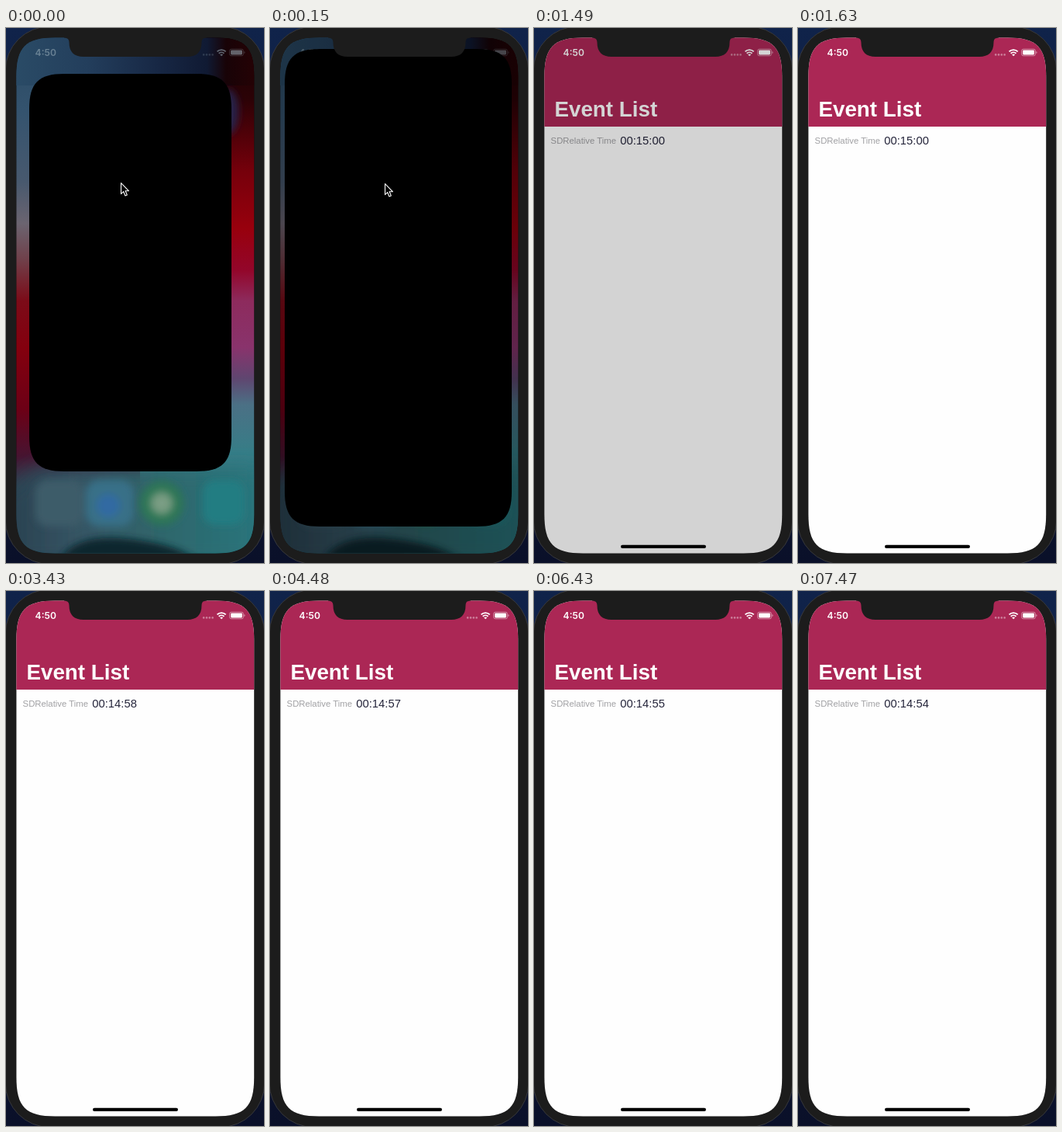
Recreate the animation shown at these times as an HTML page. Size 333x689 px, loop 8 s.

```html
<!DOCTYPE html>
<html lang="en">
<head>
<meta charset="utf-8">
<title>Event countdown</title>
<style>
  html, body { margin: 0; width: 100%; height: 100%; overflow: hidden; background: #0b1733; }
  svg { display: block; width: 333px; height: 689px; }
  text { font-family: "Liberation Sans", Arial, sans-serif; }
  .clock { font: 600 12.1px Inter, sans-serif; }
</style>
</head>
<body>
<svg viewBox="0 0 333 689">
  <defs>
    <clipPath id="screen"><path id="screenShape"/></clipPath>
    <linearGradient id="desk" x2="0" y2="1">
      <stop stop-color="#10234a"/><stop offset="1" stop-color="#0a1029"/>
    </linearGradient>
    <linearGradient id="leftSide" x2="0" y2="1">
      <stop stop-color="#284862"/><stop offset=".14" stop-color="#34536e"/>
      <stop offset=".28" stop-color="#48596e"/><stop offset=".36" stop-color="#6b6470"/>
      <stop offset=".43" stop-color="#70404a"/><stop offset=".51" stop-color="#7c0b18"/>
      <stop offset=".6" stop-color="#84000e"/><stop offset=".72" stop-color="#6c0016"/>
      <stop offset=".81" stop-color="#471431"/><stop offset=".87" stop-color="#2d4353"/>
      <stop offset="1" stop-color="#1c4a57"/>
    </linearGradient>
    <linearGradient id="rightSide" x2="0" y2="1">
      <stop stop-color="#160204"/><stop offset=".12" stop-color="#2c0206"/>
      <stop offset=".26" stop-color="#76000b"/><stop offset=".37" stop-color="#98000d"/>
      <stop offset=".45" stop-color="#93062a"/><stop offset=".51" stop-color="#8d2b5d"/>
      <stop offset=".6" stop-color="#89336c"/><stop offset=".66" stop-color="#5f4670"/>
      <stop offset=".71" stop-color="#4b7085"/><stop offset=".8" stop-color="#377d87"/>
      <stop offset="1" stop-color="#216c74"/>
    </linearGradient>
    <linearGradient id="sky">
      <stop stop-color="#2a4b66"/><stop offset=".3" stop-color="#233e5c"/>
      <stop offset=".6" stop-color="#172744"/><stop offset=".8" stop-color="#101a33"/>
      <stop offset=".88" stop-color="#180307"/><stop offset="1" stop-color="#250205"/>
    </linearGradient>
    <linearGradient id="dock">
      <stop stop-color="#29404f"/><stop offset=".3" stop-color="#365665"/>
      <stop offset=".6" stop-color="#2f666b"/><stop offset="1" stop-color="#28757c"/>
    </linearGradient>
    <radialGradient id="green">
      <stop stop-color="#83a58c"/><stop offset=".35" stop-color="#649074"/>
      <stop offset=".65" stop-color="#2f7757"/><stop offset="1" stop-color="#2b7358"/>
    </radialGradient>
    <filter id="soft" x="-50%" y="-50%" width="200%" height="200%"><feGaussianBlur stdDeviation="5"/></filter>
    <filter id="softer" x="-50%" y="-50%" width="200%" height="200%"><feGaussianBlur stdDeviation="12"/></filter>
    <g id="status">
      <text class="clock" x="37.6" y="35.6">4:50</text>
      <g opacity=".4">
        <circle cx="255.2" cy="34.4" r="1.3"/><circle cx="259" cy="34.4" r="1.3"/>
        <circle cx="262.8" cy="34.4" r="1.3"/><circle cx="266.6" cy="34.4" r="1.3"/>
      </g>
      <g fill="none" stroke="currentColor" stroke-width="1.9">
        <path d="M272.5 30.4a8 8 0 0 1 11.2 0M274.7 32.7a5 5 0 0 1 6.8 0"/>
      </g>
      <path d="M276.1 34.3a3 3 0 0 1 4 0l-2 2z"/>
      <rect x="288.5" y="27.2" width="18" height="8.6" rx="2.5" fill="none" stroke="currentColor" stroke-width=".9" opacity=".5"/>
      <rect x="290" y="28.6" width="15" height="5.8" rx="1.3"/>
      <path d="M307.4 30v3q1.1-.4 1.1-1.5t-1.1-1.5" opacity=".5"/>
    </g>
  </defs>

  <rect width="333" height="689" fill="url(#desk)"/>
  <rect x="-.8" y="-2" width="334.6" height="692.5" rx="57" fill="#1c1c1c" stroke="#3a3b40" stroke-width=".9"/>

  <g clip-path="url(#screen)">
    <rect x="13" y="12" width="308" height="666"/>

    <g id="home">
      <rect x="13" y="12" width="160" height="666" fill="url(#leftSide)"/>
      <rect x="173" y="12" width="148" height="666" fill="url(#rightSide)"/>
      <rect x="13" y="12" width="308" height="62" fill="url(#sky)"/>
      <ellipse cx="287" cy="108" rx="13" ry="29" fill="#25234a" filter="url(#soft)"/>
      <path d="M40 566H330V690H0V600Z" fill="url(#dock)" filter="url(#softer)"/>
      <path d="M70 684Q90 650 160 658T250 690Z" fill="#08252d" filter="url(#soft)"/>
      <g filter="url(#soft)">
        <rect x="38" y="582" width="62" height="60" rx="16" fill="#3d5b69"/>
        <rect x="103" y="582" width="62" height="60" rx="18" fill="#387087"/>
        <circle cx="132" cy="615" r="15" fill="#316aa2"/>
        <rect x="254" y="582" width="54" height="58" rx="16" fill="#227d82"/>
      </g>
      <circle cx="201" cy="612" r="29" fill="url(#green)" filter="url(#soft)"/>
      <circle cx="201" cy="612" r="12" fill="#80a087" opacity=".6" filter="url(#soft)"/>
      <use href="#status" fill="#9fb3bd" color="#9fb3bd" opacity=".55"/>
      <rect id="dim" x="13" y="12" width="308" height="666"/>
      <path id="card"/>
    </g>

    <g id="app">
      <rect x="13" y="12" width="308" height="666" fill="#fefefe"/>
      <rect x="13" y="12" width="308" height="115" fill="#ab2755"/>
      <use href="#status" fill="#fff" color="#fff"/>
      <text x="26.4" y="113.7" font-size="27.8" font-weight="700" fill="#fff">Event List</text>
      <text x="21.6" y="149" font-size="11.35" fill="#a1a1a4">SDRelative Time</text>
      <text id="count" x="111.3" y="150.4" font-size="14.8" fill="#25253b"></text>
      <rect id="fade" x="13" y="12" width="308" height="666"/>
    </g>

    <rect id="bar" x="112" y="665.8" width="110" height="4.2" rx="2.1"/>
  </g>

  <path fill="#1c1c1c" d="M75 10V12.4Q81.5 12.4 81.5 18.5C81.5 31 88 37 100 37H234C246 37 252.500 31 252.500 18.500Q252.500 12.400 259 12.400V10Z"/>

  <path id="cursor" d="M.5 .7V14.700L3.700 11.700L5.900 17L8.300 16L6.100 10.800H10.500Z" stroke="#fff" stroke-width="1.1" stroke-linejoin="round"/>
</svg>
<script>
  const LOOP = 8000;
  const $ = id => document.getElementById(id);

  // Card edges and the darkness of the home screen behind it
  const launch = [
    { at: 0, box: [30, 59, 291, 571], dim: 0 },
    { at: 150, box: [19, 27, 312, 642], dim: .3 },
    { at: 290, box: [14, 14, 319, 673], dim: .7 },
    { at: 440, box: [13, 12, 321, 678], dim: 1 }
  ];
  const pointer = [
    { at: 0, x: 148, y: 199 },
    { at: 150, x: 148, y: 200 },
    { at: 290, x: 148, y: 203 },
    { at: 440, x: 148, y: 209 },
    { at: 590, x: 247, y: 440 },
    { at: 740, x: 265, y: 465 },
    { at: 1190, hidden: true }
  ];
  const ticks = [2380, 3430, 4480, 5530, 6430, 7470];
  const APP_START = 1490, APP_LIT = 1630;

  const stepAt = (steps, t) => steps.filter(s => s.at <= t).pop();
  const show = (id, on) => $(id).setAttribute('display', on ? 'inline' : 'none');
  const pad = n => String(n).padStart(2, '0');

  // Rounded box with continuous corners: e is their reach, c the pull
  function squircle([l, t, r, b], e, c) {
    return `M${l} ${t + e}C${l} ${t + c} ${l + c} ${t} ${l + e} ${t}` +
      `H${r - e}C${r - c} ${t} ${r} ${t + c} ${r} ${t + e}` +
      `V${b - e}C${r} ${b - c} ${r - c} ${b} ${r - e} ${b}` +
      `H${l + e}C${l + c} ${b} ${l} ${b - c} ${l} ${b - e}Z`;
  }

  function draw(t) {
    const { box, dim } = stepAt(launch, t);
    show('home', t < 440);
    $('card').setAttribute('d', squircle(box, 45, 12));
    $('dim').setAttribute('opacity', dim);

    const p = stepAt(pointer, t);
    show('cursor', !p.hidden);
    if (!p.hidden) $('cursor').setAttribute('transform', `translate(${p.x} ${p.y})`);

    show('app', t >= APP_START);
    $('fade').setAttribute('opacity', t < APP_LIT ? .17 : 0);
    const left = 15 * 60 - ticks.filter(at => at <= t).length;
    $('count').textContent = `00:${pad(Math.floor(left / 60))}:${pad(left % 60)}`;

    show('bar', t >= 440);
    $('bar').setAttribute('fill', t < APP_START ? '#4b4b4b' : '#000');
  }

  $('screenShape').setAttribute('d', squircle([13.4, 12.4, 320.2, 676.6], 50, 12));

  const start = performance.now();
  function frame() {
    draw((performance.now() - start) % LOOP);
    requestAnimationFrame(frame);
  }
  frame();
</script>
</body>
</html>
```
